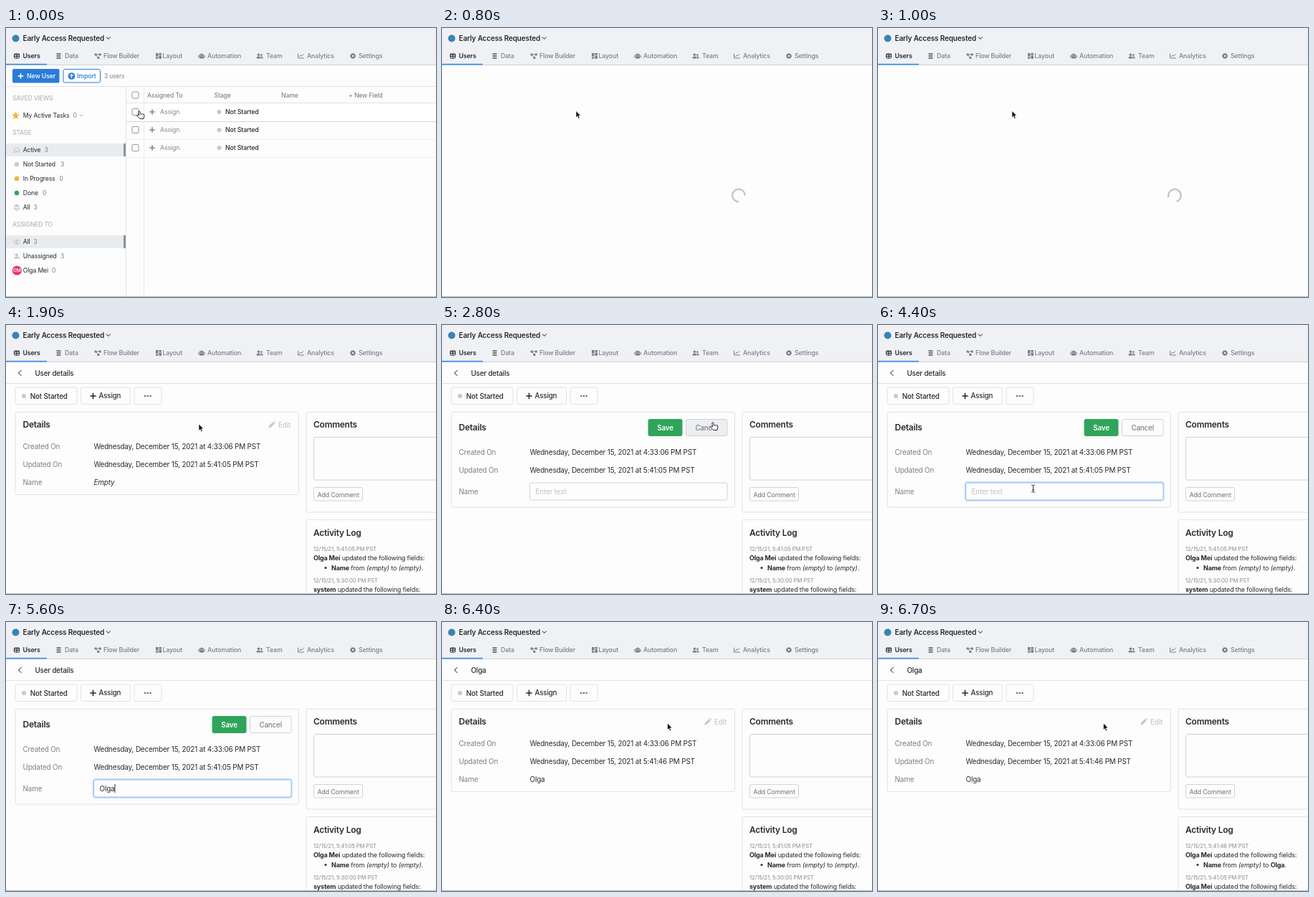
An HTML page for the animation above (8500 ms loop, 600 by 375 pixels).

```html
<!DOCTYPE html>
<html lang="en">
<head>
<meta charset="utf-8">
<title>User details</title>
<style>
  html, body { margin: 0; width: 100%; height: 100%; overflow: hidden; background: #fdfdfd; }
  svg { display: block; width: 600px; height: 375px; }
  text { font-family: Inter, "Open Sans", sans-serif; letter-spacing: -.015em; white-space: pre; }
</style>
</head>
<body>
<svg id="stage" viewBox="0 0 600 375"></svg>
<script>
const LOOP = 8500, STEP = 100;
const FIRST = 'Olga', USER = FIRST + ' Mei';
const INK = '#27292d', GRAY = '#7b7f85', PALE = '#c5c8cc', LINE = '#e0e2e5', PAPER = '#fdfdfd';
const BLUE = '#2b7cd9', GREEN = '#30a45b';

// Text is placed by its left edge and the middle of its capitals.
const text = (x, y, s, fill = INK, size = 8.8, weight = 400, more = '') =>
  `<text x="${x}" y="${y + size * .36}" fill="${fill}" font-size="${size}" font-weight="${weight}" ${more}>${s}</text>`;
const rect = (x, y, w, h, fill, stroke = 'none', r = 0) =>
  `<rect x="${x}" y="${y}" width="${w}" height="${h}" rx="${r}" fill="${fill}" stroke="${stroke}"/>`;
const box = (x, y, w, h, stroke = LINE, fill = PAPER) => rect(x, y, w, h, fill, stroke, 2);
const dot = (x, y, r, fill) => `<circle cx="${x}" cy="${y}" r="${r}" fill="${fill}"/>`;
const line = (d, stroke, w = 1) =>
  `<path d="${d}" fill="none" stroke="${stroke}" stroke-width="${w}" stroke-linecap="round" stroke-linejoin="round"/>`;
const shape = (d, fill) => `<path d="${d}" fill="${fill}"/>`;
const at = (x, y, s) => `<g transform="translate(${x} ${y})">${s}</g>`;
const plus = (x, y, c, r = 3.3) => line(`M${x - r} ${y}h${2 * r}M${x} ${y - r}v${2 * r}`, c, 1.6);
const bold = s => `<tspan font-weight="700">${s}</tspan>`;
const ital = s => `<tspan font-style="italic">${s}</tspan>`;

// Icons, centred on 0,0
const people = c => dot(-1.6, -1.8, 1.7, c) + dot(2.4, -1.4, 1.3, c) +
  shape('M-4.6 3.4Q-4.6.4-1.6.4T1.4 3.4zM2 3.4Q2 1.3 1.2.6 4.6 0 4.6 3.4z', c);
const icons = {
  table: c => rect(-3.5, -3, 7, 6, 'none', c, 1) + line('M-3.5-2H3.5M-3.5.4H3.5M0-2V3', c),
  data: c => [-2.8, 0, 2.8].map(y => rect(-3.2, y - 1.1, 6.4, 2.2, c, 'none', 1)).join(''),
  flow: c => line('M-3-2H3M-3-2L1 2.5', c) + [[-4.5, -3.5], [1.8, -3.5], [-.6, 1]].map(p => rect(...p, 3, 3, c, 'none', .5)).join(''),
  layout: c => rect(-4, -4, 3.4, 4.6, c) + rect(.4, -4, 3.6, 2.6, c) + rect(-4, 1.5, 3.4, 2.3, c) + rect(.4, -.6, 3.6, 4.4, c),
  robot: c => rect(-3.2, -2.4, 6.4, 6, c, 'none', 1) + rect(-4.8, -.8, 1, 3, c) + rect(3.8, -.8, 1, 3, c) +
    rect(-.5, -4, 1, 2, c) + dot(-1.4, 0, .8, '#f0f1f4') + dot(1.4, 0, .8, '#f0f1f4'),
  team: people,
  chart: c => line('M-4-3V3H4M-2.2 1L-.5-1.2 1 .2 3.5-2.4', c),
  gear: c => `<circle r="2.3" fill="none" stroke="${c}" stroke-width="1.9"/><circle r="3.5" fill="none" stroke="${c}" stroke-width="1" stroke-dasharray="1.6 1.15"/>`,
  inbox: c => line('M-4 .5L-2.5-2.8H2.5L4 .5V3H-4zM-4 .5H-1.6L-1 1.6H1L1.6.5H4', c),
  layers: c => shape('M0-4.2L4.4-2.2 0-.2-4.4-2.2z', c) + line('M-4 .2L0 2 4 .2M-4 2.3L0 4.1 4 2.3', c, 1.2),
  crowd: c => dot(0, -1.6, 1.6, c) + dot(-3.6, -2, 1.1, c) + dot(3.6, -2, 1.1, c) +
    shape('M-2.8 3.4Q-2.8.6 0 .6T2.8 3.4zM-5.4 1.6Q-5.2-.6-3-.3L-3.4 1.6zM5.4 1.6Q5.2-.6 3-.3L3.4 1.6z', c),
  nobody: c => dot(0, -1.8, 1.9, c) + shape('M-3.6 3.6Q-3.6.6 0 .6T3.6 3.6z', c) + line('M-4.5-3.8L4.5 3.8', c),
  star: c => shape('M0-5.4L1.6-1.8 5.4-1.5 2.5 1.1 3.4 5 0 2.9-3.4 5-2.5 1.1-5.4-1.5-1.6-1.8z', c),
  pencil: c => shape('M-4.8 4.6L-4.1 1.7 1.4-3.8 3.8-1.4-1.7 4.1zM2.1-4.4L3-5.2 5.2-3 4.4-2.1z', c)
};
const icon = (name, x, y, c) => at(x, y, icons[name](c));

const cursors = {
  arrow: '<path d="M0 0V9.4L2.1 7.4 3.6 10.9 5.2 10.2 3.7 6.8H6.6z" fill="#000" stroke="#fff" stroke-width=".7"/>',
  hand: '<path d="M-1.2 6.4L-2.2 1.6a1 1 0 0 1 2-.5L.8 4.6q.9-.7 1.7 0 1-.7 1.7.1 1.4-.4 1.6 1 .3 3-.9 5.3H-.1Q-1.6 9.2-4 7.4-5.2 6-3.8 5.6-2.4 5.6-1.2 6.4z" fill="#fff" stroke="#111" stroke-width=".9"/>',
  beam: line('M-2-5Q0-5 0-3.6 0-5 2-5M0-3.6V3.8M-2 5.2Q0 5.2 0 3.8 0 5.2 2 5.2M-1 1.6H1', '#222', .9)
};

const tabs = [
  ['table', 15, 23.5, 'Users'], ['data', 73.5, 82, 'Data'], ['flow', 128, 136, 'Flow Builder'],
  ['layout', 213, 218.5, 'Layout'], ['robot', 273, 281, 'Automation'], ['team', 354, 363, 'Team'],
  ['chart', 411.5, 420, 'Analytics'], ['gear', 484, 492, 'Settings']
];

function header() {
  return rect(0, 0, 600, 51, '#f0f1f4') + rect(0, 51, 600, 1, '#d0d3d8') + rect(0, 49.8, 57, 1.7, '#3f90ec') +
    dot(13.5, 14.5, 5, '#3684b8') + text(23.5, 14, 'Early Access Requested', INK, 10, 600) +
    line('M140.2 12.8L142.8 15.4 145.4 12.8', '#666', 1.2) +
    tabs.map(([name, ix, x, s], i) => icon(name, ix, 39, i ? GRAY : INK) +
      text(x, 39, s, i ? GRAY : INK, 8.8, i ? 500 : 600)).join('');
}

function sidebar() {
  const title = (y, s) => text(9, y, s, '#b3b7bc', 8.5, 500);
  const pick = y => rect(0, y - 9, 168, 18, '#e9ecef') + rect(164, y - 9, 4, 18, '#8d9298');
  const row = (y, s, x, n) => text(23.8, y, s, INK, 8.65) + text(x, y, n, GRAY, 8.5);
  return title(97.5, 'SAVED VIEWS') + icon('star', 13.5, 122, '#f5b62f') + row(122, 'My Active Tasks', 93.5, 0) +
    line('M103.2 121.2L105 123 106.8 121.2', '#aaa') +
    title(146, 'STAGE') + pick(170) + icon('inbox', 15, 170, PALE) + row(170, 'Active', 53.5, 3) +
    dot(15, 190, 3.2, '#c8cacd') + row(190, 'Not Started', 76, 3) +
    dot(15, 210, 3.2, '#efb32c') + row(210, 'In Progress', 74.5, 0) +
    dot(15, 230, 3.2, GREEN) + row(230, 'Done', 51, 0) +
    icon('layers', 15, 250, PALE) + row(250, 'All', 38.5, 3) +
    title(274, 'ASSIGNED TO') + pick(298) + icon('crowd', 15, 298, PALE) + row(298, 'All', 38.5, 3) +
    icon('nobody', 15, 318, PALE) + row(318, 'Unassigned', 76, 3) +
    dot(15.3, 338, 6.6, '#e9366f') + text(15.3, 338, 'OM', '#fff', 6.6, 500, 'text-anchor="middle"') +
    row(338, USER, 64, 0);
}

function list() {
  const check = y => rect(176, y - 4.5, 9, 9, '#fff', '#8d9196', 1.5);
  const head = [[197, 'Assigned To'], [290.5, 'Stage'], [384, 'Name'], [478, '+ New Field']];
  const rows = [117, 142, 167].map((y, i) =>
    (i ? '' : rect(168, 105, 432, 25, '#fff')) + rect(168, y + 13, 432, 1, i ? '#ebecee' : '#d3d5d8') +
    check(y) + plus(204, y, '#85898e') + text(215, y, 'Assign', '#85898e') +
    dot(297.5, y, 3.1, '#c8cacd') + text(306, y, 'Not Started', INK, 8.8, 500)).join('');
  return rect(9, 57, 65.5, 19.5, BLUE, 'none', 2) + plus(20.5, 67, '#fff') + text(29, 67, 'New User', '#fff', 8.8, 500) +
    box(80, 57.5, 51.5, 18.5, BLUE) + dot(91.5, 67, 4.8, BLUE) +
    line('M91.5 69.5V64.8M89.4 66.7L91.5 64.6 93.6 66.7', '#fff', 1.1) + text(99, 67, 'Import', BLUE, 8.8, 500) +
    text(137, 67, '3 users', GRAY, 8.3) + rect(0, 81, 600, 1, LINE) + sidebar() +
    rect(168, 104, 432, 1, LINE) + rows + check(93.5) +
    head.map(([x, s]) => text(x, 93.5, s, '#6d7176', 8.7)).join('') +
    rect(167, 82, 1, 293, LINE) + rect(192, 82, 1, 293, '#e9eaed');
}

function spinner(t) {
  return `<g transform="translate(414 233.5) rotate(${(t - 800) * .36})">` +
    '<path d="M8.8 0A8.8 8.8 0 1 0 0 8.8" fill="none" stroke="#c6c7ca" stroke-width="2.5"/></g>';
}

function activity(saved) {
  const date = (y, time) => text(429, y, `12/15/21, ${time} PM PST`, '#85898e', 7.7);
  const who = (y, name) => text(429, y, bold(name) + ' updated the following fields:', INK, 8.95);
  const empty = ital('(empty)');
  return box(419, 271.5, 200, 120) + text(429, 289.5, 'Activity Log', INK, 11.9, 600) +
    date(312.5, saved ? '5:41:46' : '5:41:05') + who(325, USER) + dot(446, 338.5, 1.5, INK) +
    text(454, 338.5, `${bold('Name')} from ${empty} to ${saved ? bold(FIRST) : empty}.`, INK, 8.95) +
    date(356, saved ? '5:41:05' : '5:30:00') + who(369, saved ? USER : 'system');
}

function page(saved, logged) {
  return line('M21.2 63.4L17.4 67 21.2 70.6', '#6d7176', 1.3) +
    text(40.5, 67.3, saved ? FIRST : 'User details', INK, 9.8, 500) + rect(0, 81, 600, 1, LINE) +
    box(13, 87, 86, 23.5) + dot(25, 99, 3.1, '#c8cacd') + text(33.8, 99, 'Not Started', INK, 9.8, 500) +
    box(104.5, 87, 69, 23.5) + plus(121.5, 99, INK, 3.6) + text(129.6, 99, 'Assign', INK, 9.7, 500) +
    box(179, 87, 38, 23.5) + [194, 197.8, 201.6].map(x => dot(x, 99, 1.35, '#777')).join('') +
    box(419, 121.5, 200, 139.5) + text(429, 139, 'Comments', INK, 11.9, 600) +
    box(429.5, 156.5, 190, 59.5, '#cfd2d6') + box(429.5, 226.5, 68, 18.5, '#cfd2d6') +
    text(434.5, 236.5, 'Add Comment', '#6d7176') + activity(logged);
}

function fields(y, gap, saved) {
  const day = 'Wednesday, December 15, 2021 at ';
  return [['Created On', '4:33:06'], ['Updated On', saved ? '5:41:46' : '5:41:05']].map(([s, time], i) =>
    text(23.5, y + i * 25, s, GRAY, 9.9) + text(122.5, y + i * 25, `${day}${time} PM PST`, INK, 9.9)).join('') +
    text(23.5, y + 25 + gap, 'Name', GRAY, 9.9);
}

function view(saved, hover) {
  const c = hover ? GRAY : PALE;
  return box(13, 121.5, 395.5, 115) + text(23.5, 139, 'Details', INK, 11.9, 600) +
    icon('pencil', 371, 139, c) + text(380, 139, 'Edit', c, 9.9, 500) + fields(169.3, 24.7, saved) +
    text(122.5, 219, saved ? FIRST : ital('Empty'), INK, 9.9);
}

function edit(t, x, y) {
  const onButton = y > 130 && y < 155;
  const focus = Math.min(1, Math.max(0, (t - 3800) / 300));
  const typed = FIRST.slice(0, [5000, 5100, 5300, 5500].filter(k => t >= k).length);
  const caret = (t >= 3900 && t < 4400) || t >= 4900;
  const save = onButton && x < 336 && t >= 5700 ? '#278a4b' : GREEN;
  // Caret offset follows the measured width of the typed letters.
  pen.font = '9.9px Inter, "Open Sans", sans-serif';
  const end = 130.5 + pen.measureText(typed).width - typed.length * .15;
  return box(13, 121.5, 395.5, 132.5) + text(23.5, 143, 'Details', INK, 11.9, 600) +
    box(288, 131.5, 47, 23, save, save) +
    text(311.5, 143, 'Save', '#fff', 9.8, 600, 'text-anchor="middle"') +
    box(340.5, 131.5, 57.5, 23, '#cfd2d6', onButton && x > 340 ? '#eceef0' : PAPER) +
    text(369.2, 143, 'Cancel', GRAY, 9.8, 500, 'text-anchor="middle"') + fields(177.8, 29.2) +
    `<rect x="122.2" y="219.7" width="276" height="24.6" rx="3" fill="none" stroke="#bcd9f8" stroke-width="2.8" opacity="${focus}"/>` +
    box(122.5, 220, 275.5, 24, focus ? '#93c0f3' : '#cfd2d6') +
    (typed ? text(130.5, 232, typed, INK, 9.9) : text(130.5, 232, 'Enter text', '#bec1c5', 9.9)) +
    (caret ? rect(end, 226, .9, 12, '#111') : '');
}

// Pointer moves: start, end, from, to
const moves = [
  [1900, 2600, [269, 138], [379, 135.5]],
  [3400, 3900, [379, 135.5], [216.5, 228]],
  [5700, 6000, [303, 150], [314.5, 141]]
];
function pointer(t) {
  let pos = [187, 115.5];
  for (const [a, b, from, to] of moves) {
    if (t < a) break;
    const k = 1 - (1 - Math.min(1, (t - a) / (b - a))) ** 2;
    pos = from.map((v, i) => v + (to[i] - v) * k);
  }
  return pos;
}

function scene(t) {
  const [x, y] = pointer(t);
  const editing = t >= 2800 && t < 6300, saved = t >= 6300;
  const onEdit = t < 2800 && x > 365;
  let kind = 'arrow', body;
  if (t < 700) body = list();
  else if (t < 1200) body = spinner(t);
  else body = page(saved, t >= 6700) + (editing ? edit(t, x, y) : view(saved, onEdit));
  if (t < 700 || onEdit || (editing && y < 155 && (x > 340 || x < 336))) kind = 'hand';
  else if (editing && y > 220) kind = 'beam';
  const hidden = t >= 5000 && t < 5700;
  return rect(0, 0, 600, 375, PAPER) + header() + body + rect(0, 374, 600, 1, '#b4b6b9') +
    (hidden ? '' : at(x, y, cursors[kind]));
}

const stage = document.getElementById('stage');
const pen = document.createElement('canvas').getContext('2d');
const start = performance.now();
let last = -1;
function tick() {
  const t = Math.floor((performance.now() - start) % LOOP / STEP) * STEP;
  if (t !== last) stage.innerHTML = scene(last = t);
  requestAnimationFrame(tick);
}
tick();
</script>
</body>
</html>
```
